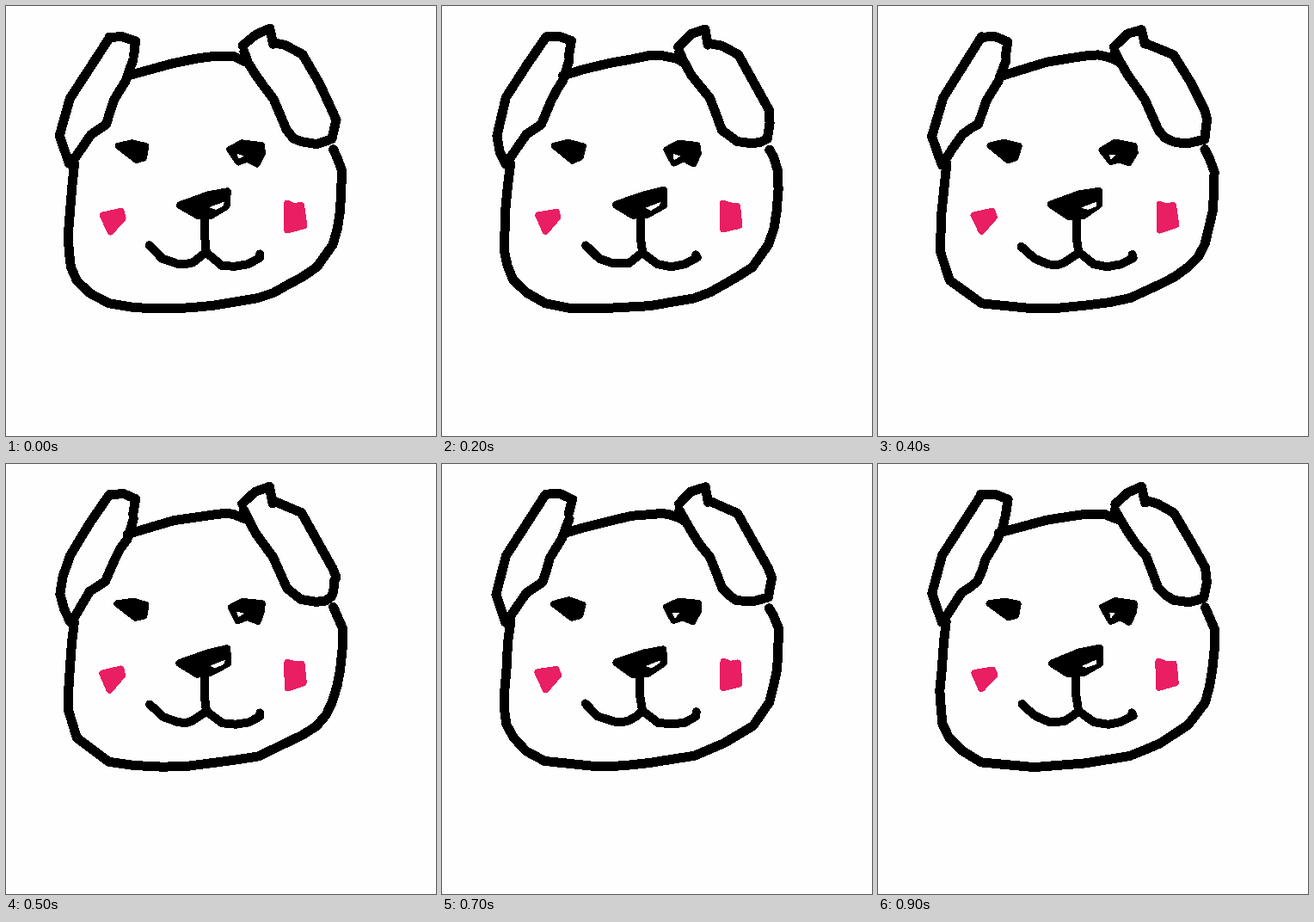
An HTML page that plays this animation: 500x500 px, repeating every 1000 ms.

```html
<!DOCTYPE html>
<html lang="en">
<head>
<meta charset="utf-8">
<title>Wobbly dog</title>
<style>
  html, body { margin: 0; width: 100%; height: 100%; overflow: hidden; background: #fefefe; }
  #strip {
    display: block; width: 1000vw; height: 100vh;
    animation: boil 1s steps(10, end) infinite;
  }
  @keyframes boil { to { transform: translateX(-100%); } }
  path {
    fill: none; stroke: #000; stroke-width: 11;
    stroke-linecap: round; stroke-linejoin: round; shape-rendering: crispEdges;
  }
  .thin { stroke-width: 10; }
  .ink { fill: #000; stroke-width: 8; }
  .nose { stroke-width: 9; }
  .blush { fill: #e91e63; stroke: #e91e63; stroke-width: 8; }
  .gap { fill: #fefefe; stroke: #fefefe; stroke-width: 1; }
</style>
</head>
<body>
<svg id="strip" viewBox="0 0 5000 500" preserveAspectRatio="none"></svg>
<script>
const STEPS = 10;
const WOBBLE = 0.9;

// Small seeded generator, so every loop is drawn alike.
let seed = 7;
function random() {
  seed = (seed * 16807) % 2147483647;
  return seed / 2147483647;
}

const shake = v => (v + (random() * 2 - 1) * WOBBLE).toFixed(1);
const join = pts => 'M' + pts.map(p => p.map(shake)).join('L');
const parse = keys => keys.split(' ').map(p => p.split(',').map(Number));

// Middle of a Catmull-Rom span.
const middle = (a, b, c, d) => b.map((v, i) => (9 * (v + c[i]) - a[i] - d[i]) / 16);

// Traces a curve by straight pieces; a span is split in two half of the time.
function curve(keys, cls = '') {
  const pts = parse(keys);
  const traced = pts.flatMap((p, i) => {
    const next = pts[i + 1];
    if (!next || random() < 0.5) return [p];
    return [p, middle(pts[i - 1] || p, p, next, pts[i + 2] || next)];
  });
  return `<path class="${cls}" d="${join(traced)}"/>`;
}

const line = (keys, cls = '') => `<path class="${cls}" d="${join(parse(keys))}"/>`;
const blob = (keys, cls) => `<path class="${cls}" d="${join(parse(keys))}Z"/>`;

function head() {
  return curve('141,81 195,66 243,58 264,59 282,66') +
    curve('380,167 391,192 389,238 380,277 361,304 328,324 293,340 ' +
      '241,348 182,352 120,346 83,319 73,285 74,240 80,183');
}

function ears() {
  return curve('120,36 75,107 63,151 74,184') +
    curve('76,183 98,149 116,137 126,110 140,87 148,63') +
    line('120,36 136,35 151,41 148,58') +
    line('275,47 290,33 306,27 310,45') +
    curve('311,43 344,57 380,121 382,137 379,155 361,160 343,158 326,144 311,108 290,80 276,53');
}

function face() {
  return blob('130,162 147,159 163,163 160,176 151,179', 'ink') +
    blob('261,167 275,159 297,162 298,171 292,183 281,178 270,182', 'ink') +
    blob('269,173 276,174 271,178', 'gap') +
    blob('202,231 235,219 257,215 257,232 238,243 222,244', 'ink nose') +
    blob('238,235 254,229 253,232 243,237', 'gap') +
    line('231,242 231,270 233,287', 'thin') +
    curve('167,279 182,293 199,300 217,299 233,287', 'thin') +
    line('233,287 251,301 267,303 282,301 296,293 296,289', 'thin') +
    blob('112,243 133,239 135,246 121,262', 'blush') +
    blob('327,230 335,233 343,232 346,255 327,260', 'blush');
}

// One redrawing of the dog per step, side by side on the strip.
document.getElementById('strip').innerHTML = Array.from({ length: STEPS }, (_, i) =>
  `<g transform="translate(${i * 500})">${head()}${ears()}${face()}</g>`
).join('');
</script>
</body>
</html>
```
